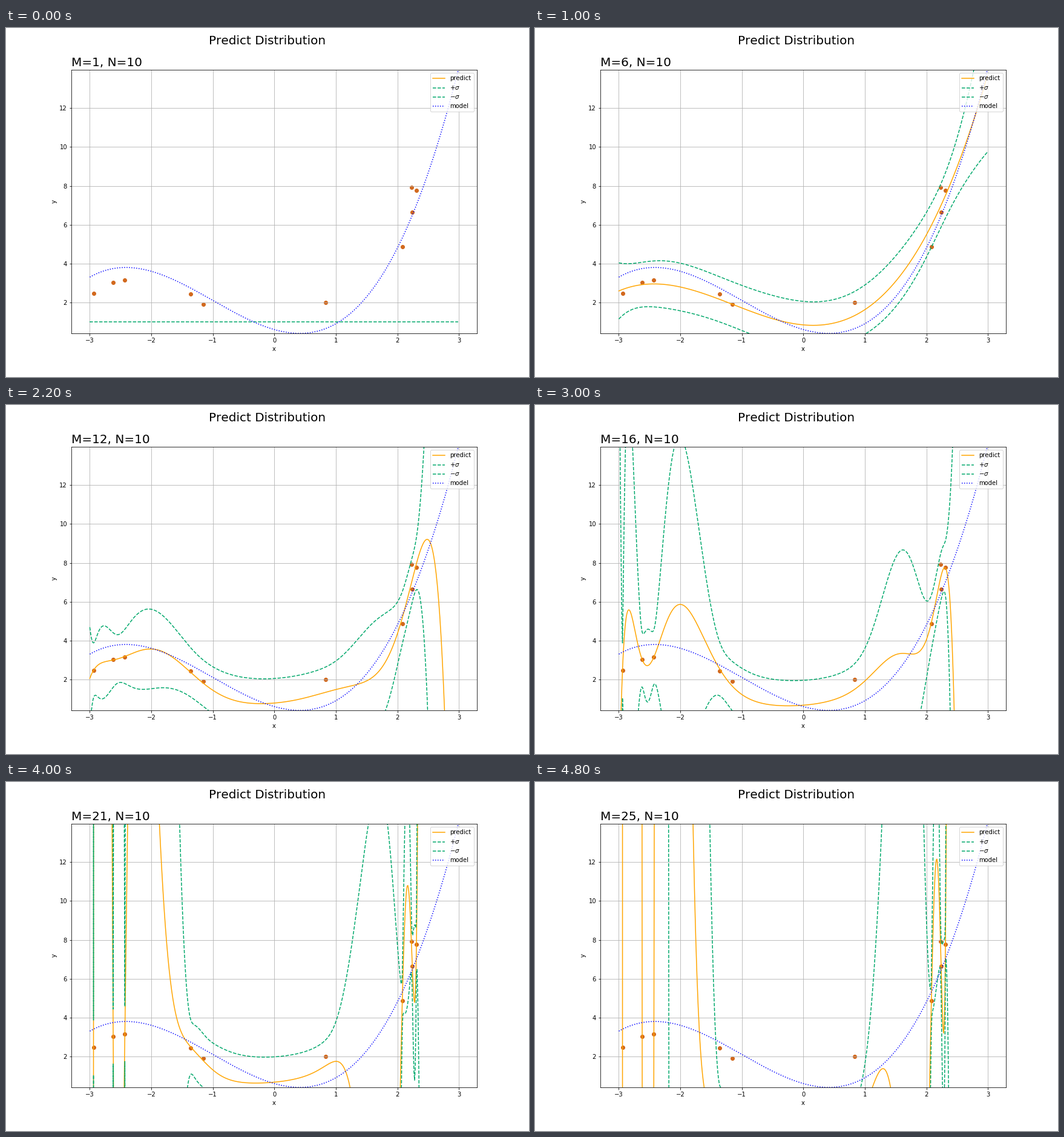
A matplotlib script for the animation above (5000 ms loop, 864 by 576 pixels).

```python
import numpy as np
import matplotlib.pyplot as plt
from matplotlib.animation import FuncAnimation

WIDTH, HEIGHT, DPI = 864, 576, 72
FRAMES, INTERVAL = 25, 200
GREEN = "#00a86b"

plt.rcParams["font.family"] = "DejaVu Sans"
plt.rcParams["text.kerning_factor"] = 6

xs = np.arange(-3, 3, 0.01)
model = 0.3 * (xs**3 + 3 * xs**2 - 3 * xs + 2)

# Observations as (x, y), with x on the sampling grid.
samples = np.array([(-2.94, 2.46), (-2.62, 3.02), (-2.43, 3.15), (-1.36, 2.43),
                    (-1.15, 1.90), (0.83, 1.99), (2.08, 4.87), (2.23, 7.92),
                    (2.24, 6.64), (2.31, 7.77)])
x_data, y_data = samples.T
x_data = xs[np.rint((x_data + 3) / 0.01).astype(int)]


def powers(x, terms):
    return x[:, None] ** np.arange(terms)


def predict(terms):
    """Mean and deviation of Bayesian polynomial regression with unit prior."""
    phi, basis = powers(x_data, terms), powers(xs, terms)
    cov = np.linalg.inv(phi.T @ phi + np.eye(terms))
    mean = basis @ (cov @ (phi.T @ y_data))
    with np.errstate(invalid="ignore"):
        sigma = np.sqrt(1 + np.sum((basis @ cov) * basis, axis=1))
    return mean, sigma


fig = plt.figure(figsize=(WIDTH / DPI, HEIGHT / DPI), dpi=DPI, facecolor="white")
fig.subplots_adjust(left=0.125, right=0.9, bottom=0.125, top=0.88)
fig.suptitle("Predict Distribution", fontsize=20)
ax = fig.add_subplot()
title = ax.set_title("", fontsize=20, loc="left")
ax.scatter(x_data, y_data, color="chocolate")
mean_line, = ax.plot([], [], color="orange", label="predict")
upper, = ax.plot([], [], color=GREEN, linestyle="--", label=r"$+\sigma$")
lower, = ax.plot([], [], color=GREEN, linestyle="--", label=r"$-\sigma$")
ax.plot(xs, model, color="blue", linestyle=":", label="model")
margin = 0.05 * np.ptp(xs)
ax.set(xlabel="x", ylabel="y", xlim=(xs[0] - margin, xs[-1] + margin),
       ylim=(model.min(), model.max()))
ax.grid(True)
ax.legend(loc="upper right")


def update(i):
    mean, sigma = predict(i)
    title.set_text(f"M={i + 1}, N={len(x_data)}")
    mean_line.set_data(xs, mean)
    upper.set_data(xs, mean + sigma)
    lower.set_data(xs, mean - sigma)
    return mean_line, upper, lower, title


anim = FuncAnimation(fig, update, frames=FRAMES, interval=INTERVAL,
                     repeat=True, repeat_delay=0)
plt.show()
```
